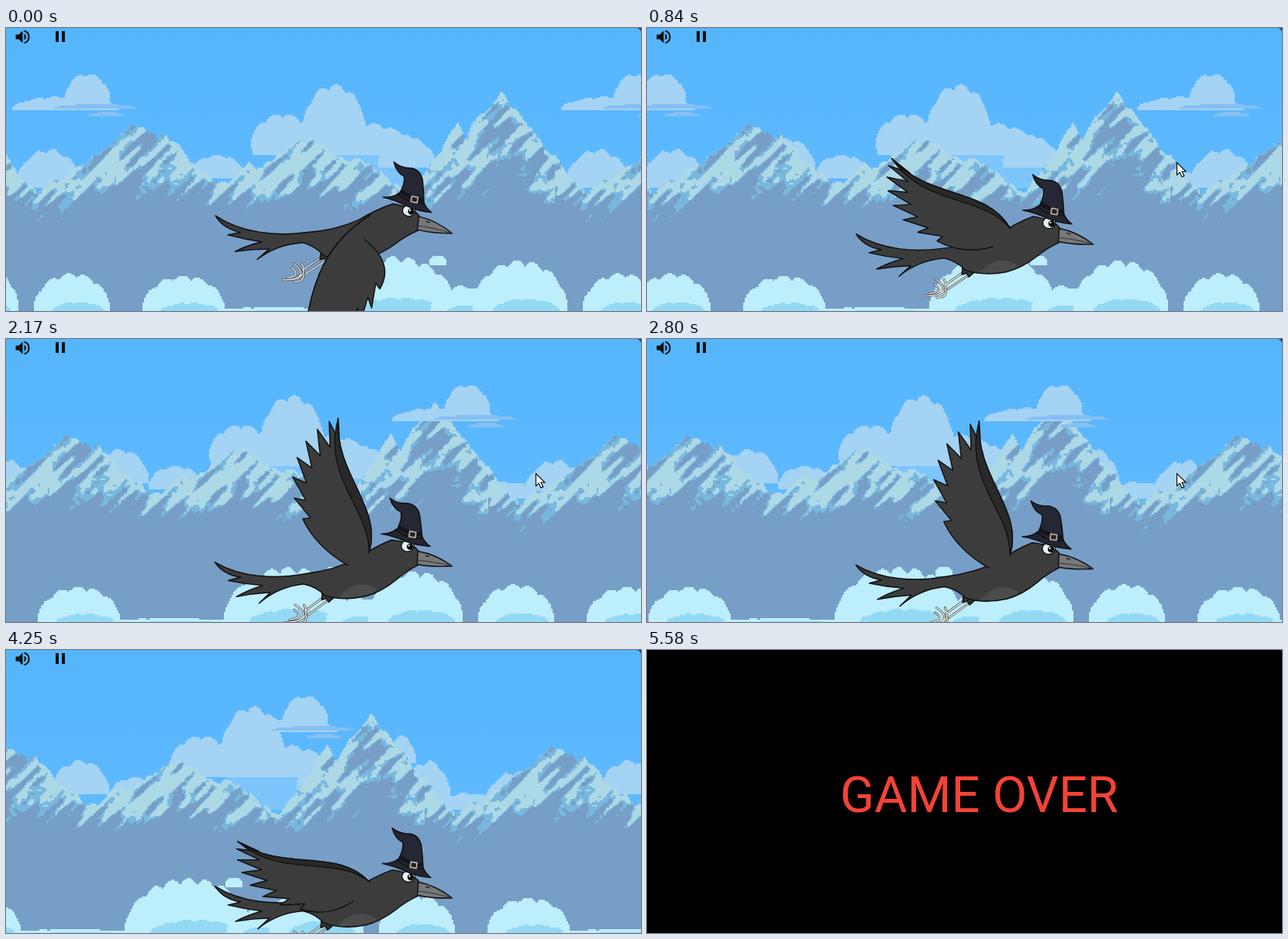
An HTML page with a canvas that plays this animation: 819x365 px, repeating every 6.04 s.

```html
<!DOCTYPE html>
<html lang="en">
<head>
<meta charset="utf-8">
<title>Crow flight</title>
<style>
html, body { margin: 0; overflow: hidden; background: #000; }
canvas { display: block; }
</style>
</head>
<body>
<canvas id="stage" width="819" height="365"></canvas>
<script>
const ctx = document.getElementById('stage').getContext('2d');
const LOOP = 6040, GAME_OVER = 5580, TILE = 708, FLAP = 620, PIXEL = 2;
const INK = '#0d0d0f', CROW = '#3c3c3c';

const lerp = (a, b, f) => a + (b - a) * f;
const snap = v => PIXEL * Math.round(v / PIXEL);

// Smooth value noise in 0..1.
function noise(x, y) {
  const hash = (i, j) => { const s = Math.sin(i * 127.1 + j * 311.7) * 43758.5; return s - Math.floor(s); };
  const ease = f => f * f * (3 - 2 * f);
  const i = Math.floor(x), j = Math.floor(y), u = ease(x - i), v = ease(y - j);
  return lerp(lerp(hash(i, j), hash(i + 1, j), u), lerp(hash(i, j + 1), hash(i + 1, j + 1), u), v);
}

// Half-resolution layer that is enlarged without smoothing and repeats sideways.
function makeTile(paint) {
  const canvas = document.createElement('canvas');
  canvas.width = TILE / PIXEL;
  canvas.height = 183;
  const g = canvas.getContext('2d');
  g.scale(1 / PIXEL, 1 / PIXEL);
  paint(g);
  return canvas;
}

// Flat-based cloud with a lumpy round top.
function cloud(g, color, x, base, halfWidth, height) {
  g.fillStyle = color;
  for (let dx = -snap(halfWidth); dx <= halfWidth; dx += PIXEL) {
    const lumps = 0.88 + 0.12 * Math.abs(Math.sin(dx * 0.14 + x));
    const top = snap(height * lumps * Math.sqrt(Math.max(0, 1 - (dx / halfWidth) ** 2)));
    g.fillRect((snap(x) + dx + TILE) % TILE, base - top, PIXEL, top);
  }
}

const farClouds = makeTile(g => {
  cloud(g, '#7cc5fd', 450, 206, 90, 56);
  for (const place of [
    [422, 140, 42, 68], [355, 156, 42, 46], [425, 164, 110, 46], [515, 180, 38, 40],
    [272, 194, 36, 31], [54, 206, 42, 50], [200, 186, 38, 44], [614, 146, 19, 36],
    [648, 196, 30, 54], [700, 206, 46, 22]
  ]) cloud(g, '#a4d3f4', ...place);
});

// Peak x, peak y, half width.
const PEAKS = [[168, 123, 124], [203, 134, 68], [390, 140, 120], [312, 172, 40], [455, 164, 55], [582, 122, 62], [638, 84, 108]];

function ridge(x) {
  const rise = PEAKS.map(([px, py, w]) => {
    const d = Math.abs(x - px);
    return (209 - py) * Math.max(0, 1 - Math.min(d, TILE - d) / w) ** 1.1;
  });
  return snap(209 - Math.max(...rise) + 9 * (noise(x / 7, 0) - 0.5));
}

const mountains = makeTile(g => {
  for (let x = 0; x < TILE; x += PIXEL) {
    const top = ridge(x);
    g.fillStyle = '#779ec6';
    g.fillRect(x, top, PIXEL, 366 - top);
    // Snow runs in slanted streaks and thins out with depth.
    for (let y = top; y < 250; y += PIXEL) {
      const depth = y - top;
      const grain = 0.8 * noise((x + y) / 9, (x - y) / 40) + 0.2 * noise(x / 4, y / 4);
      const snow = grain - depth / 260 - Math.max(0, y - 200) / 110 + (depth < 5 ? 0.08 : 0);
      if (snow < 0.29) continue;
      g.fillStyle = snow > 0.42 ? '#add8e6' : '#78b8de';
      g.fillRect(x, y, PIXEL, PIXEL);
    }
  }
});

const smallCloud = makeTile(g => {
  cloud(g, '#a4d3f4', 104, 96, 30, 38);
  cloud(g, '#a4d3f4', 76, 106, 70, 18);
  cloud(g, '#86bff3', 114, 104, 54, 6);
  cloud(g, '#86bff3', 128, 114, 24, 6);
});

const nearClouds = makeTile(g => {
  for (const [x, halfWidth, height] of [[84, 50, 50], [228, 54, 47], [350, 80, 6], [498, 84, 72], [586, 40, 34], [662, 62, 67]]) {
    cloud(g, '#bdeefc', x, 366, halfWidth, height);
    cloud(g, '#93d9f4', x + 8, 366, halfWidth * 0.7, height * 0.25);
  }
  cloud(g, '#bdeefc', 556, 306, 12, 14);
});

function scroll(tile, speed, t) {
  ctx.imageSmoothingEnabled = false;
  for (let x = -(t * speed) % TILE; x < 819; x += TILE) ctx.drawImage(tile, Math.round(x), 0, TILE, 366);
}

// Angle of the wing's leading edge: 0 points back, negative is up.
const FLAP_KEYS = [[0, 64], [0.1, 64], [0.355, -30], [0.48, -78], [0.55, -78], [0.855, -16], [0.87, 64], [1, 64]];
const HEIGHT_KEYS = [[0, 265], [840, 279], [2170, 293], [3430, 300], [4250, 320], [4890, 345], [5580, 372]];

function valueAt(keys, t) {
  let i = 0;
  while (i < keys.length - 2 && t >= keys[i + 1][0]) i++;
  const [t0, a] = keys[i], [t1, b] = keys[i + 1];
  return lerp(a, b, (t - t0) / (t1 - t0));
}

function shape(path, fill, stroke = INK, width = 1.4) {
  const p = typeof path === 'string' ? new Path2D(path) : path;
  if (fill) { ctx.fillStyle = fill; ctx.fill(p); }
  if (stroke) { ctx.strokeStyle = stroke; ctx.lineWidth = width; ctx.stroke(p); }
}

function disc(color, x, y, rx, ry = rx) {
  ctx.fillStyle = color;
  ctx.beginPath();
  ctx.ellipse(x, y, rx, ry, 0, 0, 7);
  ctx.fill();
}

// lift runs from 0 (wing down) to 1 (wing up).
function drawWing(lead, lift) {
  const root = [470, 260], FEATHERS = 8;
  const polar = (degrees, radius) => {
    const a = degrees * Math.PI / 180;
    return [root[0] - radius * Math.cos(a), root[1] + radius * Math.sin(a)];
  };
  const spread = 36 + 14 * lift ** 3;
  const inner = polar(lead - 30, 62), outer = polar(lead + Math.min(11, 50 * lift - 15), 110);
  const feather = (f, reach = 1) => polar(lead + spread * f ** 1.3, reach * (178 - 82 * f ** 2.2));
  const tip = feather(0);

  const wing = new Path2D();
  wing.moveTo(...root);
  wing.bezierCurveTo(...inner, ...outer, ...tip);
  for (let i = 1; i < FEATHERS; i++) {
    const last = FEATHERS - 1;
    wing.lineTo(...feather((i - 0.4) / last, 0.83));
    wing.quadraticCurveTo(...feather((i - 0.15) / last, 0.93), ...feather(i / last));
  }
  wing.quadraticCurveTo(...polar(lead + spread + 20, 70), ...polar(57 + 0.35 * lead, 32));
  shape(wing, CROW);

  // Darker band along the leading edge.
  const dx = root[0] - tip[0], dy = root[1] - tip[1], k = 17 * lift / Math.hypot(dx, dy);
  const shifted = ([x, y]) => [x - dy * k, y + dx * k];
  const band = new Path2D();
  band.moveTo(...root);
  band.bezierCurveTo(...inner, ...outer, ...tip);
  band.bezierCurveTo(...shifted(outer), ...shifted(inner), ...root);
  shape(band, '#292929', INK, 1.2);
}

function drawCrow(t) {
  const lead = valueAt(FLAP_KEYS, (t / FLAP) % 1), lift = (64 - lead) / 142;
  ctx.save();
  ctx.translate(575.5, valueAt(HEIGHT_KEYS, t));
  ctx.rotate((2.4 - 3.3 * lift ** 1.5) * Math.PI / 180);
  ctx.translate(-577, -279);
  ctx.lineJoin = ctx.lineCap = 'round';

  const legs = 'M411 316L386 334M420 318L390 339M374 326Q392 338 378 346M385 326Q396 347 361 348M372 332Q386 342 366 345M376 350Q388 350 388 340';
  shape(legs, null, '#444', 2.8);
  shape(legs, null, '#e9e9e4', 1.4);
  shape('M409 309L408 320 414 318 417 323 426 315Z', '#333');

  shape('M534 259C528 250 515 246 499 244Q478 252 455 267Q425 282 386 286C350 292 305 290 271 269' +
    'Q281 285 304 289L288 293Q310 298 332 300Q312 306 298 314Q320 310 342 309L327 323' +
    'Q352 302 385 299Q402 303 412 314Q435 322 465 316Q485 311 505 295Q518 284 533 277Z', CROW);
  shape('M430 317Q444 301 460 301Q475 301 480 309Q462 319 430 317Z', '#4b4b4b', null);

  drawWing(lead, lift);

  shape('M533 259Q556 263 577 279Q552 280 532 276Z', '#777879');
  shape('M533 271Q552 272 577 279', null, '#333', 1);
  shape('M543 265l4 1', null, '#222', 1.5);
  disc(INK, 520, 252, 8.8, 7.8);
  disc('#e4f4f5', 520, 252, 7.6, 6.6);
  disc('#08080a', 523, 253, 4.2);
  disc('#fff', 521.5, 251.5, 1.2);

  shape('M486 236Q499 236 506 230L539 241Q543 249 549 253Q532 252 517 246Q502 239 486 236Z', '#24252f');
  shape('M506 232Q514 217 512 208Q502 204 498 190Q508 198 521 197Q533 199 536 212Q538 226 539 242Q520 243 506 232Z', '#262734');
  shape('M507 230Q522 239 539 240L539 235Q523 234 510 225Z', '#15151c', null);
  shape('M523 233l8 1.5-1 7-8-1.5z', '#222', '#b9b2a2', 1.7);
  ctx.restore();
}

function drawControls() {
  shape('M12.5 8.5v6h4l5 5v-16l-5 5zM26 11.5c0-1.8-1-3.3-2.5-4v8c1.5-.7 2.5-2.2 2.5-4z', '#111', null);
  shape('M23.5 3.7c8 2 8 13.6 0 15.6', null, '#111', 2);
  shape('M64 4h4v14h-4zM72 4h4v14h-4z', '#111', null);
  shape('M814 0h5v5q-1-4-5-5z', '#333', null);
}

function drawGameOver() {
  ctx.fillStyle = '#000';
  ctx.fillRect(0, 0, 819, 365);
  ctx.fillStyle = '#f44336';
  ctx.font = '65px Roboto, sans-serif';
  ctx.fillText('GAME OVER', 249, 208.5);
  shape('M816 0h3v3q0-3-3-3z', '#a02a22', null);
}

function drawFlight(t) {
  const sky = ctx.createLinearGradient(0, 0, 0, 220);
  sky.addColorStop(0, '#55b5fb');
  sky.addColorStop(1, '#60baff');
  ctx.fillStyle = sky;
  ctx.fillRect(0, 0, 819, 365);
  scroll(farClouds, 0.0247, t);
  scroll(mountains, 0.0395, t);
  scroll(smallCloud, 0.1005, t);
  scroll(nearClouds, 0.062, t);
  drawCrow(t);
  drawControls();
  if (t >= 420 && t < 3850) shape('M683.5 173.5v16l3.7-3.4 2.8 6 2.8-1.3-2.8-5.8h5z', '#fff', '#000', 1.1);
}

function frame(now) {
  const t = now % LOOP;
  const offset = t < 4250 ? 0 : 50;
  if (t >= GAME_OVER) drawGameOver();
  else drawFlight(Math.floor((t - offset) / 70) * 70 + offset);
  requestAnimationFrame(frame);
}
requestAnimationFrame(frame);
</script>
</body>
</html>
```
